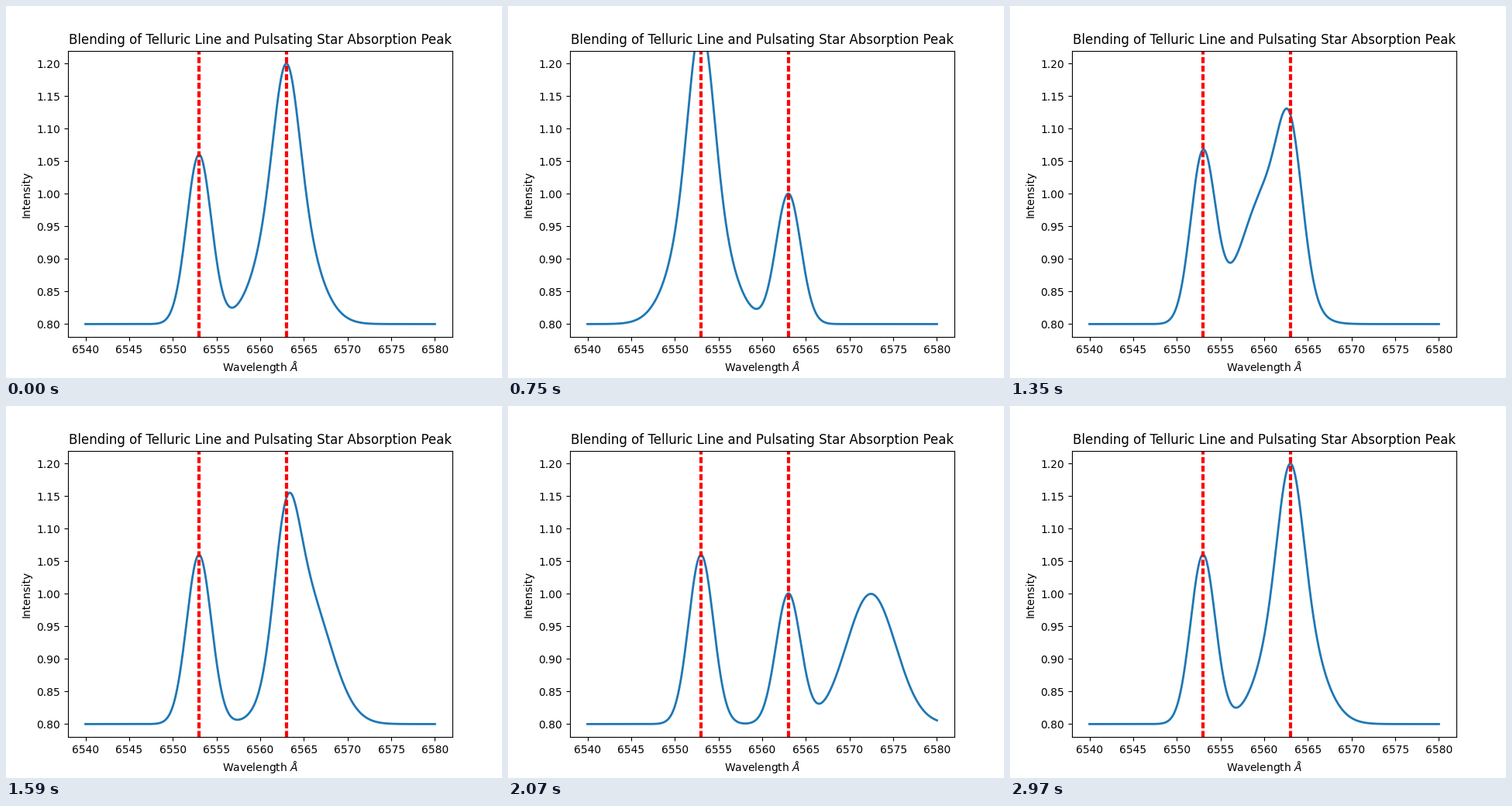
Write a matplotlib script that moves like this. It is 640x480 px and loops after 3000 ms.

```python
import numpy as np
import matplotlib.pyplot as plt
from matplotlib.animation import FuncAnimation

FRAMES = 100
BASE = 0.8
TELLURIC, REST = 6553, 6563


def bell(x, center, height, variance):
    return height * np.exp(-(x - center) ** 2 / (2 * variance))


wave = np.linspace(6540, 6580, 1000)
fixed = BASE + bell(wave, TELLURIC, 0.26, 2) + bell(wave, REST, 0.2, 2)

fig, ax = plt.subplots(figsize=(6.4, 4.8), dpi=100)
ax.set_xlim(6538, 6582)
ax.set_ylim(0.78, 1.22)
ax.set_title("Blending of Telluric Line and Pulsating Star Absorption Peak")
ax.set_xlabel(r"Wavelength $\AA$")
ax.set_ylabel("Intensity")

curve, = ax.plot([], [], lw=2)
for x in (TELLURIC, REST):
    ax.axvline(x, color="red", lw=3, ls=(0, (1.85, 0.8)))


def update(i):
    center = REST - 10 * np.sin(2 * np.pi * i / (FRAMES - 1))
    curve.set_data(wave, fixed + bell(wave, center, 0.2, 8))
    return curve,


anim = FuncAnimation(fig, update, frames=FRAMES, interval=30,
                     repeat=True, repeat_delay=0)
plt.show()
```
